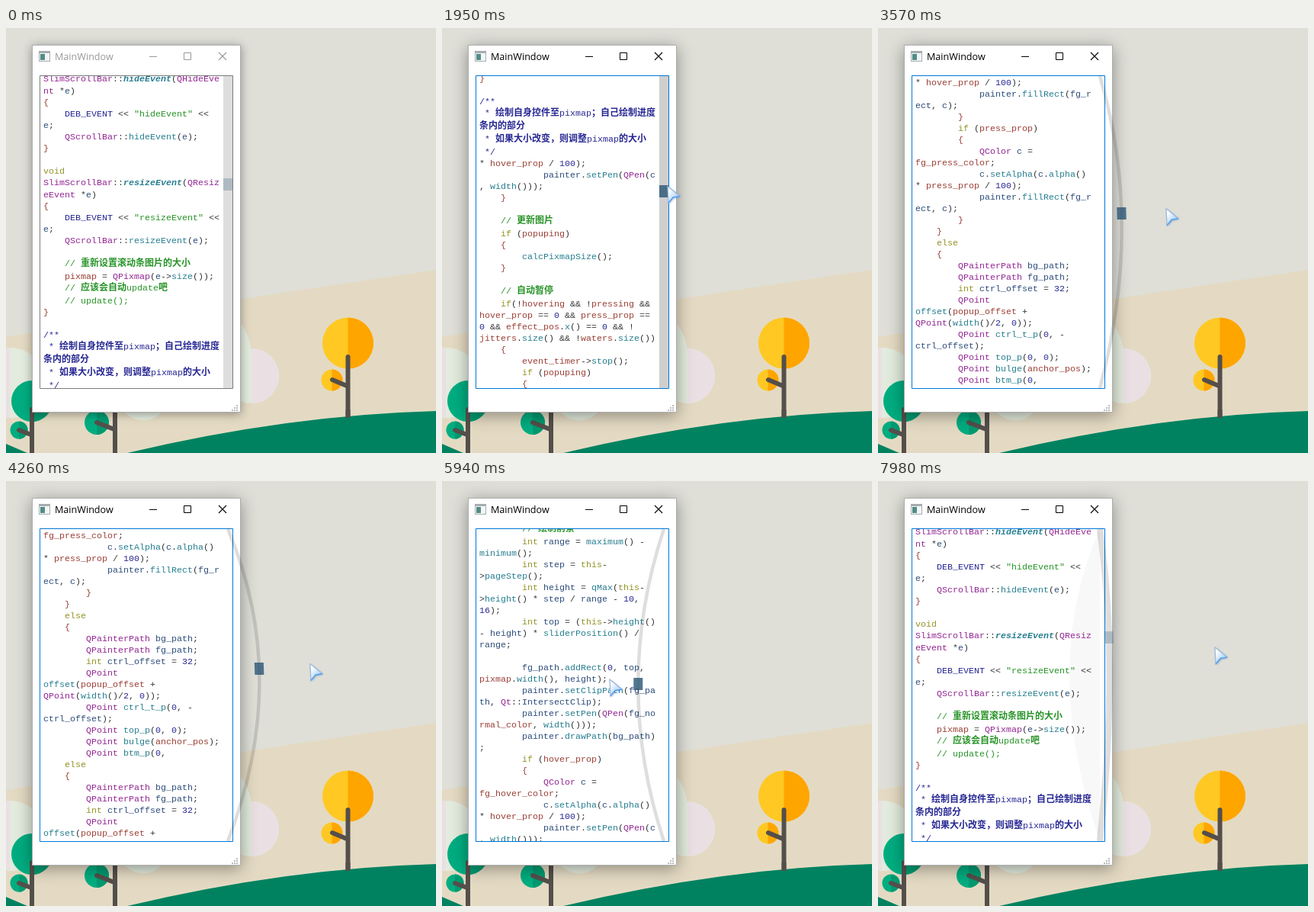
An HTML page with a canvas that plays this animation: 564x557 px, repeating every 8000 ms.

```html
<!DOCTYPE html>
<html lang="en">
<head>
<meta charset="utf-8">
<title>Elastic scroll bar</title>
<style>
html, body { margin: 0; width: 100%; height: 100%; overflow: hidden; }
canvas { display: block; }
</style>
</head>
<body>
<canvas id="stage" width="564" height="557"></canvas>
<script>
const ctx = document.getElementById('stage').getContext('2d');
const LOOP = 8000, STEP = 30, PRESS = 1020, PULL = 3240, RELEASE = 7290;
const TOP = 63, BOTTOM = 472, MIDDLE = (TOP + BOTTOM) / 2;
const BAR_X = 291, BAR_WIDTH = 12, HANDLE = 16;
const MONO = '11.667px "Liberation Mono", monospace';
const CJK = 'bold 12px "Noto Sans CJK SC", "Noto Sans CJK", sans-serif';

// ---- Document ----
const events = `    DEB_EVENT <<
"contextMenuEvent" << e;
    QScrollBar::contextMenuEvent(
e);
}

void
SlimScrollBar::hideEvent(QHideEve
nt *e)
{
    DEB_EVENT << "hideEvent" <<
e;
    QScrollBar::hideEvent(e);
}

void
SlimScrollBar::resizeEvent(QResiz
eEvent *e)
{
    DEB_EVENT << "resizeEvent" <<
e;
    QScrollBar::resizeEvent(e);

    // 重新设置滚动条图片的大小
    pixmap = QPixmap(e->size());
    // 应该会自动update吧
    // update();
}

~/**
~ * 绘制自身控件至pixmap；自己绘制进度
~条内的部分
~ * 如果大小改变，则调整pixmap的大小
~ */`.split('\n');

const blend = (kind, call) => `        if (${kind}_prop)
        {
            QColor c =
fg_${kind}_color;
            c.setAlpha(c.alpha()
* ${kind}_prop / 100);
            painter.${call}`;
const fillCall = `fillRect(fg_r
ect, c);
        }`;

const painting = `        QRect fg_rect(0, top,
width(), height);
        painter.fillRect(fg_rect,
fg_normal_color);
${blend('hover', fillCall)}
${blend('press', fillCall)}
    }
    else
    {
        QPainterPath bg_path;
        QPainterPath fg_path;
        int ctrl_offset = 32;
        QPoint
offset(popup_offset +
QPoint(width()/2, 0));
        QPoint ctrl_t_p(0, -
ctrl_offset);
        QPoint top_p(0, 0);
        QPoint bulge(anchor_pos);
        QPoint btm_p(0,`.split('\n');

const foreground = `        // 绘制前景
        int range = maximum() -
minimum();
        int step = this-
>pageStep();
        int height = qMax(this-
>height() * step / range - 10,
16);
        int top = (this->height()
- height) * sliderPosition() /
range;

        fg_path.addRect(0, top,
pixmap.width(), height);
        painter.setClipPath(fg_pa
th, Qt::IntersectClip);
        painter.setPen(QPen(fg_no
rmal_color, width()));
        painter.drawPath(bg_path)
;
${blend('hover', 'setPen(QPen(c\n, width()));')}`.split('\n');

const timer = `    }

    // 更新图片
    if (popuping)
    {
        calcPixmapSize();
    }

    // 自动暂停
    if(!hovering && !pressing &&
hover_prop == 0 && press_prop ==
0 && effect_pos.x() == 0 && !
jitters.size() && !waters.size())
    {
        event_timer->stop();
        if (popuping)
        {
            popuping = false;
            popup-
>setGeometry(-2, -2, 0, 0);
            // 删除popup
            popup->deleteLater();
            popup = nullptr;
        }
    }

    update();`.split('\n');

const TOKEN = /(\/\/.*|"[^"]*")|\b(Q[A-Za-z]\w*|SlimScrollBar|eEvent|nt)\b|\b(void|int|if|else|this|false|nullptr)\b|\b(\d+|DEB_EVENT)\b|([A-Za-z]\w*)(?=\()|(\b(?:\w+_prop|\w+_color|\w+_pos|popup\w*|pixmap|hovering|pressing|jitters|waters|event_timer)\b|[{}])|(\w+)|\s+|./g;
const COLORS = ['#111', '#008000', '#800080', '#808000', '#000080', '#00677c', '#8a1f14', '#092e64'];
const isCjk = s => /[\u3000-\uffff]/.test(s);

function parse(line) {
  const runs = [];
  let x = 49;
  const add = (text, color, style = '') => {
    for (const part of text.match(/[\u3000-\uffff]+|[^\u3000-\uffff]+/g) || []) {
      const wide = isCjk(part);
      runs.push({ text: part, x, color, font: wide ? CJK : style + MONO });
      x += part.length * (wide ? 12 : 7);
    }
  };
  if (line[0] === '~') add(line.slice(1), '#000080');
  else for (const m of line.matchAll(TOKEN)) {
    const kind = Math.max(0, m.findIndex((g, i) => i && g));
    const title = kind === 5 && line.startsWith('SlimScrollBar::');
    add(m[0], COLORS[kind], title ? 'italic bold ' : '');
  }
  return runs;
}

// Blocks sit at fixed heights; spare code fills the space between them.
const lines = [];
let docY = 4400, spare = 0;
const filler = [...foreground, ...timer, ...painting];
function push(line) {
  lines.push({ y: docY, runs: parse(line) });
  docY += isCjk(line) ? 17 : line.startsWith('SlimScrollBar::') ? 16 : 15;
}
for (const [start, block] of [[4785, events], [6117, painting], [7082, foreground], [10252, timer], [11300, []]]) {
  while (docY + 15 <= start) push(filler[spare++ % filler.length]);
  docY = start;
  block.forEach(push);
}

// ---- Motion ----
// Waypoints of the drag: time, scroll offset, pointer x
const DRAG = [
  [900, 4824, 297], [PRESS, 4824, 291], [1260, 4713, 291], [1740, 5130, 295], [1950, 5130, 295],
  [2460, 6048, 296], [2640, 6120, 296], [PULL, 6125, 296], [3570, 6181, 377], [4020, 6250, 404],
  [4440, 6300, 394], [4650, 6300, 394], [5040, 10188, 403], [5430, 9900, 274], [5940, 7020, 219],
  [6240, 6150, 228], [6510, 6150, 228], [RELEASE, 4824, 437], [LOOP, 4824, 441]];

// Smooth curve through one column of the waypoints, without overshoot
function along(t, col) {
  if (t <= DRAG[0][0]) return DRAG[0][col];
  const slope = i => (DRAG[i + 1][col] - DRAG[i][col]) / (DRAG[i + 1][0] - DRAG[i][0]);
  const tangent = i => {
    if (i < 1 || i > DRAG.length - 2) return 0;
    const a = slope(i - 1), b = slope(i);
    return a * b > 0 ? 2 * a * b / (a + b) : 0;
  };
  const i = DRAG.findIndex(k => k[0] > t) - 1;
  const span = DRAG[i + 1][0] - DRAG[i][0];
  const u = (t - DRAG[i][0]) / span, v = 1 - u;
  return DRAG[i][col] * v * v * (1 + 2 * u) + DRAG[i + 1][col] * u * u * (3 - 2 * u)
    + span * u * v * (tangent(i) * v - tangent(i + 1) * u);
}
function ease(t, from, to) {
  const u = Math.min(1, Math.max(0, (t - from) / (to - from)));
  return u * u * (3 - 2 * u);
}
const bend = x => .42 * (x - BAR_X) - 3.5;

function pose(t) {
  const scroll = along(t, 1), dragX = along(t, 2);
  const handleY = 71 + scroll / 36;
  const away = 1 - ease(t, 90, 900);
  const s = Math.max(0, t - RELEASE) / 1000;
  return {
    scroll, handleY,
    x: dragX + 266 * away,
    y: handleY - 7 - 152 * away + 19 * ease(t, 7000, RELEASE),
    pull: s ? bend(437) * Math.exp(-1.4 * s) * Math.cos(10.5 * s)
      : bend(dragX) * ease(t, PULL, 3660),
    press: ease(t, 900, 1560) - ease(t, RELEASE, 7600),
    trackDark: ease(t, 900, 1200) - ease(t, PULL, 3500)
  };
}

// ---- Drawing ----
function rect(x, y, w, h, color) {
  ctx.fillStyle = color;
  ctx.fillRect(x, y, w, h);
}
function disc(x, y, r, left, right = left) {
  for (const [color, from, to] of [[left, 0, 2], [right, -.5, .5]]) {
    ctx.fillStyle = color;
    ctx.beginPath();
    ctx.arc(x, y, r, from * Math.PI, to * Math.PI);
    ctx.fill();
  }
}
function stroke(path, color, width, cap = 'butt') {
  ctx.strokeStyle = color;
  ctx.lineWidth = width;
  ctx.lineCap = cap;
  ctx.stroke(new Path2D(path));
}
function fill(path, color) {
  ctx.fillStyle = color;
  ctx.fill(new Path2D(path));
}
function label(text, x, y, font, color) {
  ctx.font = font;
  ctx.fillStyle = color;
  ctx.fillText(text, x, y);
}

function landscape() {
  const mint = '#e2ebdd', pink = '#eae0e4', leaf = ['#00ad80', '#009a70'], gold = ['#ffc823', '#ffa500'];
  rect(0, 0, 564, 557, '#dfdfd8');
  fill('M0 405Q280 358 564 317V557H0Z', '#e4dac3');
  disc(5, 465, 46, pink, mint);
  disc(252, 430, 70, mint);
  disc(322, 456, 36, mint, pink);
  disc(180, 480, 34, mint);
  fill('M159 557Q370 507 564 502V557ZM0 545L28 557H0Z', '#008260');
  disc(34, 489, 27, ...leaf);
  disc(17, 527, 11.5, ...leaf);
  disc(119, 517, 16, ...leaf);
  disc(448.5, 413, 33.5, ...gold);
  disc(427.5, 461.5, 14, ...gold);
  stroke('M34 500V560M17 527L33 533M143 500V560M119 517L142 526M448.5 431V508M428 461L447 469', '#544f4b', 6, 'round');
  stroke('M448.5 500V511', '#544f4b', 6);
}

function appWindow(active) {
  ctx.save();
  ctx.shadowColor = 'rgba(0,0,0,.38)';
  ctx.shadowBlur = active ? 20 : 12;
  ctx.shadowOffsetY = active ? 4 : 2;
  rect(34, 22, 274, 482, '#fff');
  ctx.restore();
  stroke('M34.5 22.5H307.5V503.5H34.5Z', 'rgba(90,90,90,.5)', 1);
  const ink = active ? '#000' : '#999';
  rect(43, 30, 15, 14, '#a5adb0');
  rect(44, 33, 13, 10, '#f4f6f6');
  rect(45, 34, 6, 8, '#538c88');
  label('MainWindow', 64, 42, '12.6px "Open Sans", sans-serif', ink);
  stroke('M188 37.5H198M233.5 32.5H242.5V41.5H233.5Z', ink, 1);
  stroke('M279 32L289 42M289 32L279 42', ink, 1.1);
  for (let i = 0; i < 3; i++)
    for (let j = 2 - i; j < 3; j++) rect(296 + j * 3, 494 + i * 3, 2, 2, '#bbb');
  stroke('M44.5 62.5H297.5V472.5H44.5Z', active ? '#0078d7' : '#7a7a7a', 1);
}

function codeText(scroll) {
  ctx.save();
  ctx.beginPath();
  ctx.rect(45, TOP, 240, BOTTOM - TOP);
  ctx.clip();
  ctx.globalAlpha = .85;
  for (const { y, runs } of lines) {
    const at = Math.round(y - scroll);
    if (at > 45 && at < 490)
      for (const r of runs) label(r.text, r.x, at + 4, r.font, r.color);
  }
  ctx.restore();
}

function barPath(pull, y) {
  return `M${BAR_X} ${TOP}Q${BAR_X + 2 * pull} ${MIDDLE + .4 * (y - MIDDLE)} ${BAR_X} ${BOTTOM}`;
}
function scrollBar({ pull, handleY, press, trackDark }, rebound) {
  const path = barPath(pull, handleY);
  if (rebound) fill(barPath(-40, handleY) + 'Z', 'rgba(0,0,0,.028)');
  stroke(path, `rgba(0,0,0,${.13 + .06 * trackDark})`, Math.max(4.5, BAR_WIDTH - Math.abs(pull) / 3.5));
  ctx.save();
  ctx.beginPath();
  ctx.rect(0, Math.round(handleY - HANDLE / 2), 564, HANDLE);
  ctx.clip();
  stroke(path, `rgba(47,90,120,${.27 + .55 * press})`, BAR_WIDTH);
  ctx.restore();
}

function cursor(x, y) {
  ctx.save();
  ctx.translate(x, y);
  const shape = 'M1 1L17 14L8 15.5L2 23Z';
  const tint = ctx.createLinearGradient(2, 8, 13, 17);
  tint.addColorStop(0, '#fff');
  tint.addColorStop(1, '#a9d1f8');
  ctx.shadowColor = 'rgba(50,110,190,.6)';
  ctx.shadowBlur = 3;
  ctx.shadowOffsetX = ctx.shadowOffsetY = 1;
  fill(shape, tint);
  ctx.shadowColor = 'transparent';
  stroke(shape, '#9db9d8', 1.2);
  stroke('M17 14L8 15.5L2 23', '#5ba2ea', 1.6);
  ctx.restore();
}

function draw(now) {
  const t = Math.floor(now % LOOP / STEP) * STEP;
  const p = pose(t);
  landscape();
  appWindow(t >= PRESS);
  codeText(p.scroll);
  scrollBar(p, t > RELEASE + 250);
  if (t >= 90) cursor(p.x, p.y);
  requestAnimationFrame(draw);
}
requestAnimationFrame(draw);
</script>
</body>
</html>
```
